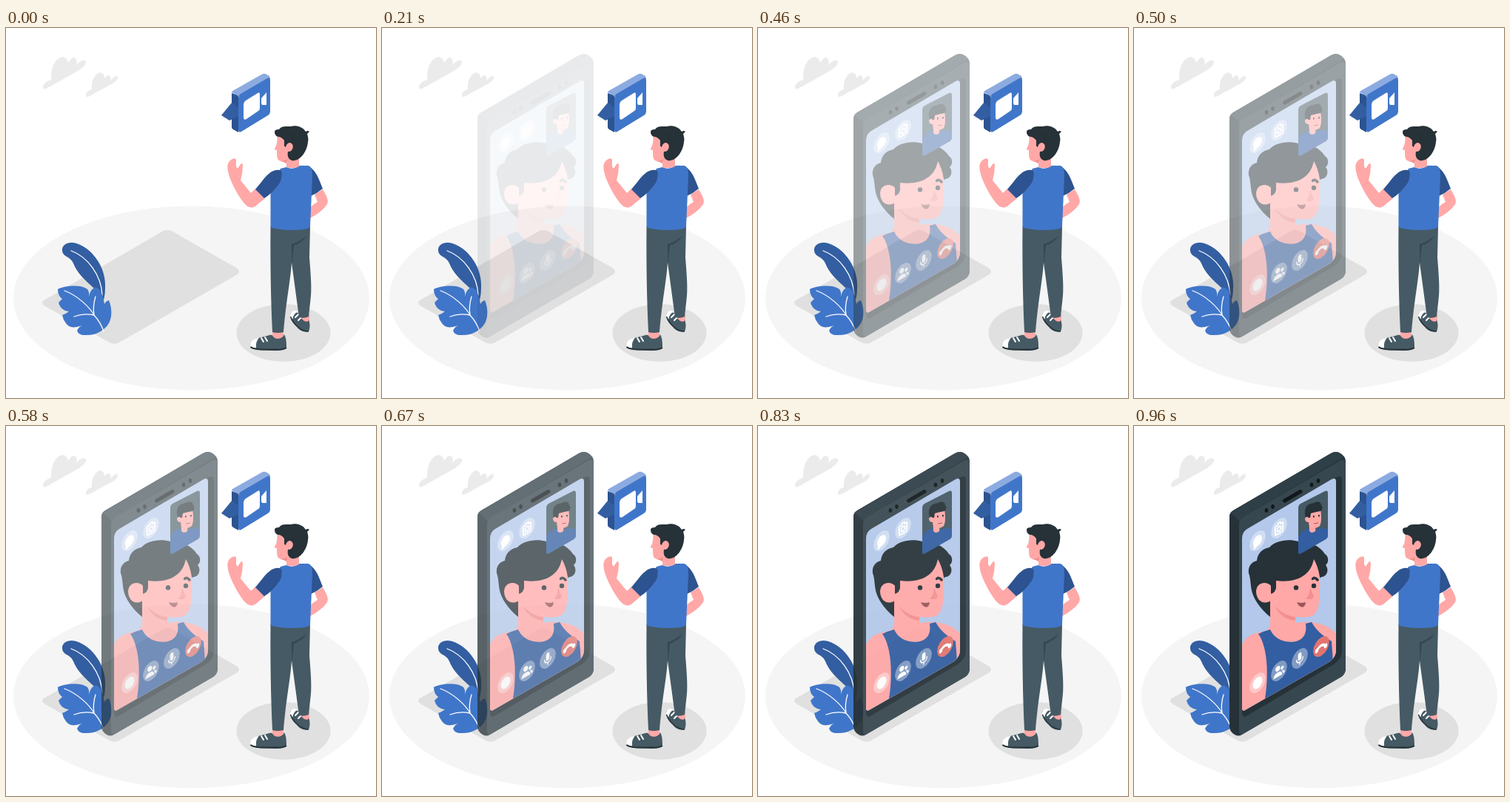
These frames come from a looping animation (500x500 px, 1 s). An HTML page:

```html
<!DOCTYPE html>
<html lang="en">
<head>
<meta charset="utf-8">
<title>Video call</title>
<style>
  html, body { margin: 0; width: 100%; height: 100%; overflow: hidden; background: #fff; }
  svg { display: block; width: 100%; height: 100%; }
  .main { fill: #4076c9; }
  .deep { fill: #335ea1; }
  .sleeve { fill: #2d5390; }
  .skin { fill: #ffa8a7; }
  .blush { fill: #f28f8f; }
  .ink { fill: #263238; }
  .cloth { fill: #455a64; }
  .slate { fill: #37474f; }
  .white { fill: #fff; }
  .shade { fill: #e0e0e0; }
  .cloud { fill: #ebebeb; }
  .line { fill: none; stroke: #fff; stroke-width: 1.3; stroke-linecap: round; }
  .lace { fill: none; stroke: #fff; stroke-width: 2; stroke-linecap: round; }
</style>
</head>
<body>
<svg viewBox="0 0 500 500">
  <defs>
    <clipPath id="screen"><path id="glass" d="M146 152Q146 143 153 139L267 72Q273 69 273 75V303Q273 312 265 318L150 384Q146 386 146 381Z"/></clipPath>
    <clipPath id="inset"><path id="card" d="M222 111Q222 107 225 105L258 88Q262 86 262 91V148Q262 151 259 153L226 172Q222 174 222 170Z"/></clipPath>
  </defs>

  <!-- floor, shadows, clouds -->
  <ellipse cx="250.5" cy="365" rx="240.5" ry="124.5" fill="#f5f5f5"/>
  <path class="shade" d="M53 367L211 275Q218 271 225 275L311 324Q319 329 311 334L153 425Q146 429 138 424L53 376Q45 371 53 367Z"/>
  <ellipse class="shade" cx="375" cy="412" rx="63.5" ry="39"/>
  <path class="cloud" d="M50 80C51 75 54 72 61 70C61 60 62 52 67 45C72 38 82 36 84 47C87 42 91 38 94 41C96 44 96 47 95 50C100 44 106 42 108 45C109 50 103 54 97 58L56 81C53 83 50 83 50 80Z"/>
  <path class="cloud" d="M108 91C108 87 111 84 116 83C115 75 118 66 123 62C128 58 133 61 133 68C136 64 139 63 141 66C142 69 141 71 140 72C146 66 150 63 151 66C152 70 146 74 142 76L113 92C110 94 108 93 108 91Z"/>

  <!-- leaves -->
  <path class="deep" d="M76 301C75 293 84 288 95 291C117 298 136 324 134 352C134 361 132 368 130 374C128 362 124 356 117 350C107 341 96 331 91 318C87 308 77 310 76 301Z"/>
  <path class="line" d="M88 301C110 309 129 334 130 361"/>
  <path class="main" d="M70 353C78 348 102 346 110 353Q113 357 112 363Q114 354 119 351C127 349 131 360 133 373Q135 369 139 368C143 377 144 390 139 399C133 409 121 416 106 415Q98 415 96 409Q98 404 103 402C91 406 85 405 81 399Q77 394 76 388Q80 387 85 383C77 382 73 378 71 371Q74 368 76 366Q70 362 70 353Z"/>
  <path class="line" d="M79 355C96 361 113 377 119 388Q128 398 132 410M119 388Q117 376 121 363M119 388Q105 385 92 390"/>

  <!-- phone -->
  <g id="phone">
    <path class="ink" d="M129 122Q129 117 134 114L266 37Q273 33 279 37Q286 41 286 48V328Q286 335 280 339L146 417Q141 420 136 417Q129 413 129 406Z"/>
    <path fill="#2f3f47" d="M131 117L266 37Q273 33 279 37L284 42L147 123Q143 125 142 128Z"/>
    <path class="slate" d="M142 132Q142 126 147 123L278 47Q286 43 286 51V328Q286 335 280 339L147 416Q142 419 142 412Z"/>
    <path class="ink" d="M146 152Q146 143 153 139L272 70L276 68.500Q281 67 281 73V303Q281 315 270 322L152 392Q146 395 146 387Z"/>
    <g fill="#11181b">
      <ellipse cx="179" cy="114" rx="2.300" ry="2.900"/><ellipse cx="187.500" cy="109" rx="2.300" ry="2.900"/>
      <ellipse cx="240" cy="79.500" rx="2.300" ry="2.900"/><ellipse cx="249" cy="74" rx="2.300" ry="2.900"/>
    </g>
    <path d="M203.500 101L225 88.500" stroke="#11181b" stroke-width="5" stroke-linecap="round"/>
    <use href="#glass" fill="#b3c8ea"/>

    <g clip-path="url(#screen)">
      <path class="skin" d="M145 297C151 284 162 279 175 278C185 275 186 268 184 235L217 255L218 266C238 263 262 266 273 281V318L145 390Z"/>
      <path class="deep" d="M168 281Q176 277 184 275C190 289 206 294 219 291C229 288 234 281 232 267L240 265C248 279 258 285 267 291L269 318L176 374C182 345 182 300 168 281Z"/>
      <path class="ink" d="M155 199C154 190 158 184 166 182C167 172 173 166 183 164C191 155 208 152 222 156C238 156 251 162 258 173C263 176 264 184 259 188C264 194 261 204 253 204L184 258C174 250 164 238 160 226C157 217 158 206 155 199Z"/>
      <path class="skin" d="M184 200L244 174C251 190 252 207 251 222C251 241 248 254 240 257C231 260 217 258 217 258L218 266L184 264Z"/>
      <path class="blush" d="M190 243C198 252 208 257 218 258V263C206 262 196 255 190 243Z"/>
      <path class="ink" d="M182 195L220 160L254 168L258 188Q262 203 251 203Q248 188 243 180C238 205 216 212 192 209V219Q190 227 183 227Z"/>
      <path class="skin" d="M185 216C179 209 166 211 165 223C165 235 174 243 185 236Z"/>
      <circle class="ink" cx="219" cy="218.500" r="3.200"/><circle class="ink" cx="243" cy="216" r="3.200"/>
      <path d="M241.500 206.500Q244 203.500 248 208" fill="none" stroke="#263238" stroke-width="3.500" stroke-linecap="round"/>
      <path class="blush" d="M238 218L243 231Q240 236 232 233Q237 231 238 218Z"/>
      <path d="M220 238Q226 240 232 238Q231 246 226 244.500Q222 243 220 238Z" fill="#9b5558"/>
    </g>

    <use href="#card" class="cloth"/>
    <g clip-path="url(#inset)">
      <path class="deep" d="M222 152C223 143 231 139 237 139C246 144 256 133 262 141V155L222 176Z"/>
      <path class="skin" d="M234 119L252 113C254 124 253 134 250 136L245 138Q247 143 241 144Q236 144 237 138L236 130Q231 130 231 125Q232 122 235 123Z"/>
      <path class="ink" d="M232 124C229 113 232 105 243 104C249 101 253 103 253 107C256 110 254 114 252 115Q246 116 239 118L238 124H236Q233 121 232 124Z"/>
      <path class="ink" d="M242 121h1.800v2.500h-1.800zM249 120h1.800v2.500h-1.800z"/>
      <path d="M243 132L249 131" stroke="#9b5558"/>
    </g>

    <!-- round buttons share the skew of the glass -->
    <g id="buttons"></g>
  </g>

  <!-- video bubble -->
  <path class="sleeve" d="M305 88L314 91V141L307 137Q305 136 305 134Z"/>
  <path fill="#8cabe0" d="M305 87Q305 85 308 84L345 63Q348 61 351 62L356 65L357 68L314 92Z"/>
  <path class="main" d="M314 94Q314 91 317 89L353 68Q357 66 357 70V113Q357 116 354 118L318 140Q314 142 314 138Z"/>
  <path class="deep" d="M305 101L291 118L302 125L314 119V107Z"/>
  <path class="white" d="M324 98L340 88Q343 86 343 90V108Q343 111 341 112L325 123Q321 125 321 121V103Q321 100 324 98ZM345 95L352 87V104L347 104Q345 104 345 101Z"/>

  <!-- caller -->
  <path class="skin" d="M417 225L428 218C432 225 437 233 434 238C430 245 420 252 411 257V244C412 240 417 238 421 235Z"/>
  <path class="sleeve" d="M408 187C418 190 423 204 428 217Q421 223 412 227Z"/>
  <path class="skin" d="M360 405H375V419Q367 423 360 418ZM397 387H410V399Q403 401 397 396Z"/>
  <path class="cloth" d="M384 387C386 381 393 382 397 388C400 396 407 399 409 395C411 398 411 406 409 410C404 412 397 409 394 405C389 400 384 395 384 387Z"/>
  <path class="white" d="M384 389C384 382 391 380 394 384Q389 385 387 394Q384 392 384 389Z"/>
  <path class="lace" d="M391 391L395 387M395 395L399 391"/>
  <path d="M384.500 390C388 400 399 410 409 410" fill="none" stroke="#263238" stroke-width="1.500"/>
  <path class="cloth" d="M330 430C331 421 340 419 349 417C356 415 359 413 361 417C365 422 374 420 376 414C379 419 379 427 379 431C379 435 372 436 364 436L340 435C334 434 330 433 330 430Z"/>
  <path class="white" d="M330 430C330 422 336 420 342 418.500Q337 424 338 432.500Q331 432 330 430Z"/>
  <path class="lace" d="M345 419L348 424M350 418L353 423"/>
  <path d="M330.500 431Q335 434 345 434.500H366Q375 434.500 379 432" fill="none" stroke="#263238" stroke-width="2"/>
  <path class="cloth" d="M357.500 268H411L410 310C412 335 413 350 412 362L409 390Q403 393 396 391L386 317C384 345 379 365 375 411Q367 413 360 411C358 370 357 320 357.500 268Z"/>
  <path class="slate" d="M386 292C393 290 400 286 406 281Q401 290 389 294L386.500 320Z"/>
  <path class="main" d="M371 190L379 188C385 191 391 190 397 186H408C413 187 414 192 414 200L411 268C411 272 400 273 385 273C372 273 361 271 357.500 269V215Z"/>
  <path class="skin" d="M337 217L350 230L338 240C333 244 328 243 324 239C316 231 305 211 301 198C299 190 298 183 303 179C307 176 311 175 311 179V187L313 190L317 184Q320 181 320 186Q320 196 317 206L331 223Z"/>
  <path class="sleeve" d="M372 193C362 188 352 199 346 207L337 218L349 230C356 226 365 217 370 209C373 204 373 197 372 193Z"/>
  <path class="skin" d="M367 144C366 152 367 157 363 163Q363 165 366 165C366 172 366 177 369 179Q373 181 379 179V188Q388 191 396 187V165L388 148Z"/>
  <path class="blush" d="M371 180Q376 180 380 177Q379 182 379 183Q376 181 371 180Z"/>
  <path class="ink" d="M364 138C362 140 363 146 368 147C371 147 374 149 376 152V159C377 162 379 161 379 158L387 157V163L381 167C380 172 381 177 386 179C397 181 407 167 408 154C409 150 408 146 407 143L410 140C407 138 406 140 405 140C401 133 391 131 385 133C378 133 372 132 369 137Q366 137 364 138Z"/>
  <ellipse class="skin" cx="383" cy="161" rx="4.700" ry="6" transform="rotate(15 383 161)"/>
</svg>
<script>
  const LOOP = 1000, FPS = 24;
  const phone = document.getElementById("phone");
  const dot = (x, y, r) => `<circle cx="${x}" cy="${y}" r="${r}" fill="#fff"/>`;
  const stroke = (d, w) => `<path d="${d}" fill="none" stroke="#fff" stroke-width="${w}" stroke-linecap="round"/>`;
  const chat = dot(0, 0, 7) + '<path d="M-6 2V10L1 6Z" fill="#fff"/>';
  const camera = stroke("M-5 -5H-2L-1 -7H2L3 -5H5Q6 -5 6 -3V5Q6 7 4 7H-4Q-6 7 -6 5V-4Q-6 -5 -5 -5Z", 2.2) +
    '<circle cy="1" r="3" fill="none" stroke="#fff" stroke-width="2"/>';
  const people = dot(-2, -4, 3.6) + dot(5, -2, 2.4) +
    '<path d="M-9 7Q-8 1 -2 1Q5 1 5 7ZM6 6Q6 3 4 2Q9 1 9 6Z" fill="#fff"/>';
  const mic = stroke("M0 -5V0", 5.5) + stroke("M-5 0Q-5 5 0 5Q5 5 5 0M0 5V8", 1.5);
  const hangUp = stroke("M-6.500 2Q0 -5 6.500 2", 3.6) + stroke("M-7 2V3M7 2V3", 5);
  const glass = "rgba(255,255,255,.38)";

  const button = ([x, y, icon, fill = glass]) =>
    `<g transform="matrix(.866 -.5 0 1 ${x} ${y})"><circle r="12.500" fill="${fill}"/>${icon}</g>`;

  document.getElementById("buttons").innerHTML = [
    [167, 155, chat], [196, 138, camera],
    [167, 347, dot(0, 0, 7.5)], [196, 331, people], [224, 314, mic],
    [253, 298, hangUp, "#e2746f"]
  ].map(button).join("");

  // Eased fade-in, held at film rate; the loop cuts back to nothing.
  const ease = p => (1 - Math.cos(Math.PI * p)) / 2;
  const start = performance.now();
  function draw(now) {
    const t = Math.max(0, now - start) % LOOP;
    const step = Math.min(FPS - 1, Math.floor((t + 4) * FPS / LOOP));
    phone.setAttribute("opacity", ease(step / FPS));
    requestAnimationFrame(draw);
  }
  draw(start);
</script>
</body>
</html>
```
